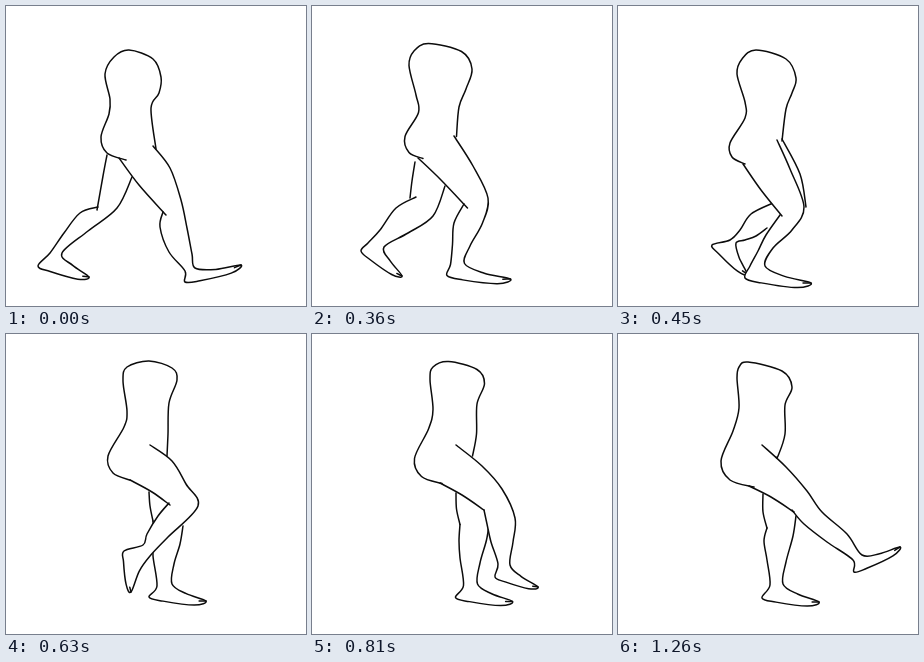
Animation, 300 px wide and 300 px high, one loop 1.35 s. Source, as an HTML page:

```html
<!DOCTYPE html>
<html lang="en">
<head>
<meta charset="utf-8">
<title>Walk cycle</title>
<style>
  html, body { margin: 0; width: 100%; height: 100%; overflow: hidden; background: #fff; }
  svg { display: block; width: 100%; height: 100%; }
  path { fill: none; stroke: #0c0c0c; stroke-width: 1.5; stroke-linecap: round; stroke-linejoin: round; }
  .solid { fill: #fff; }
  .mask { fill: #fff; stroke: none; }
</style>
</head>
<body>
<svg id="stage" viewBox="0 0 300 300"></svg>
<script>
const LOOP = 1350;
const pts = s => s.split(" ").map(p => p.split(",").map(Number));
const leg = (thigh, back, front, foot) =>
  ({ thigh: pts(thigh), back: pts(back), front: pts(front), foot: pts(foot) });

// Key poses: torso from seat over the shoulders to the hip, then both legs.
// A leg is its thigh line, calf line, front line, and heel and toe.
const stride = {
  torso: pts("120,154 101,147 95,131 103,108 104,93 99,68 108,51 123,44 147,53 155,71 153,87 145,102 150,143"),
  near: leg("113,152 133,179 160,209", "157,206 154,221 163,246 179,265",
    "147,140 164,162 175,194 181,222 186,248 189,262", "179,276 235,259"),
  far: leg("101,149 97,170 91,204", "92,201 74,207 58,227 44,247",
    "126,171 111,202 82,225 56,247", "32,260 83,271")
};
const lunge = {
  torso: pts("95,147 80,142 74,124 86,101 81,82 75,51 80,37 95,31 131,38 142,54 134,79 126,99 125,126"),
  near: leg("87,146 115,164 147,194", "142,187 136,205 141,232 145,257",
    "125,126 150,157 166,183 167,210 161,238 158,255", "143,267 204,269"),
  far: leg("89,151 80,166 65,188", "73,187 48,194 33,214 20,235",
    "122,168 93,194 56,218 26,245", "5,248 50,271")
};
const crouch = {
  torso: pts("127,158 114,151 112,137 127,112 127,96 119,68 124,53 138,44 168,53 178,72 174,87 168,103 164,135"),
  near: leg("125,158 143,184 164,210", "162,209 148,229 140,245 132,260",
    "159,134 172,163 186,201 174,224 155,242 147,260", "127,272 193,277"),
  far: leg("164,133 182,168 188,201", "155,197 133,208 122,224 112,234",
    "149,222 138,230 127,234 118,237", "94,239 129,268")
};
const pass = {
  torso: pts("124,146 107,139 102,122 118,93 121,77 117,47 121,33 143,27 166,34 171,46 163,69 162,100 161,122"),
  near: leg("124,146 146,158 164,171", "163,169 152,182 141,200 137,211",
    "144,111 166,127 180,150 192,172 162,203 144,222", "118,217 125,258"),
  far: leg("143,158 144,172 147,187", "147,187 148,207 147,222 151,252",
    "177,192 174,210 168,230 166,250", "143,263 200,267")
};
const kick = {
  torso: pts("136,153 112,146 103,127 115,97 121,74 119,44 121,33 130,28 164,37 174,53 167,71 167,100 160,122"),
  near: leg("131,152 153,163 176,178", "174,176 186,190 209,208 235,226",
    "144,111 168,133 189,157 204,178 229,200 244,221", "236,238 282,213"),
  far: leg("145,160 145,178 149,194", "149,194 146,207 149,226 152,251",
    "178,182 175,202 168,228 165,250", "144,264 201,268")
};

// Halfway between two poses, point by point
function between(a, b) {
  if (typeof a === "number") return (a + b) / 2;
  if (Array.isArray(a)) return a.map((v, i) => between(v, b[i]));
  return Object.fromEntries(Object.keys(a).map(k => [k, between(a[k], b[k])]));
}

const sink = {
  ...between(lunge, crouch),
  far: leg("103,156 100,175 98,192", "104,191 84,202 68,224 56,237",
    "133,180 121,210 96,227 72,241", "49,245 90,270")
};
const rise = between(crouch, pass);
const swing = {
  ...between(pass, kick),
  near: leg("128,149 150,161 172,176", "172,176 175,190 179,208 186,230",
    "144,111 170,132 190,155 203,184 201,208 198,231", "183,243 226,253")
};
const hold = { ...kick, torso: [...kick.torso, [158, 123]] };

// Point on a-b at t, pushed off towards the sole by a share of the length of a-b
const off = (a, b, t, push) => {
  const dx = b[0] - a[0], dy = b[1] - a[1];
  return [a[0] + dx * t - dy * push, a[1] + dy * t + dx * push];
};

function footLine([heel, toe], ankle) {
  return [heel, off(heel, toe, .25, .055), off(heel, toe, .8, .085), toe, off(ankle, toe, .45, .06)];
}

// Catmull-Rom spline as cubic segments
function curve(p) {
  let d = "M" + p[0];
  for (let i = 0; i < p.length - 1; i++) {
    const a = p[i], b = p[i + 1], before = p[i - 1] || a, after = p[i + 2] || b;
    const c1 = a.map((v, k) => v + (b[k] - before[k]) / 6);
    const c2 = b.map((v, k) => v - (after[k] - a[k]) / 6);
    d += `C${c1} ${c2} ${b}`;
  }
  return d;
}

const stage = document.getElementById("stage");
const make = (tag, parent) =>
  parent.appendChild(document.createElementNS("http://www.w3.org/2000/svg", tag));

function draw(pose) {
  const g = make("g", stage);
  const add = (d, cls = "") => {
    const p = make("path", g);
    p.setAttribute("d", d);
    p.setAttribute("class", cls);
  };
  const drawLeg = ({ thigh, back, front, foot }, cls) => {
    const up = [...front].reverse();
    add(curve([...back, ...footLine(foot, up[0]), ...up]), cls);
    add(curve(thigh));
    add(curve([foot[1], off(...foot, .88, .01)]));
  };
  drawLeg(pose.far);
  // The near thigh hides what lies behind it
  const { thigh, front } = pose.near;
  add("M" + [...thigh, ...front.slice(0, 4).reverse()].join("L") + "Z", "mask");
  drawLeg(pose.near, "solid");
  add(curve(pose.torso));
  return g;
}

const steps = [
  [0, stride], [180, lunge], [360, sink], [450, crouch],
  [540, rise], [630, pass], [810, swing], [900, kick], [1260, hold]
].map(([start, pose]) => ({ start, el: draw(pose) }));

const begin = performance.now();
function show(now) {
  const t = Math.max(0, now - begin) % LOOP;
  const current = steps.filter(s => s.start <= t).pop();
  steps.forEach(s => s.el.setAttribute("visibility", s === current ? "visible" : "hidden"));
  requestAnimationFrame(show);
}
show(begin);
</script>
</body>
</html>
```
